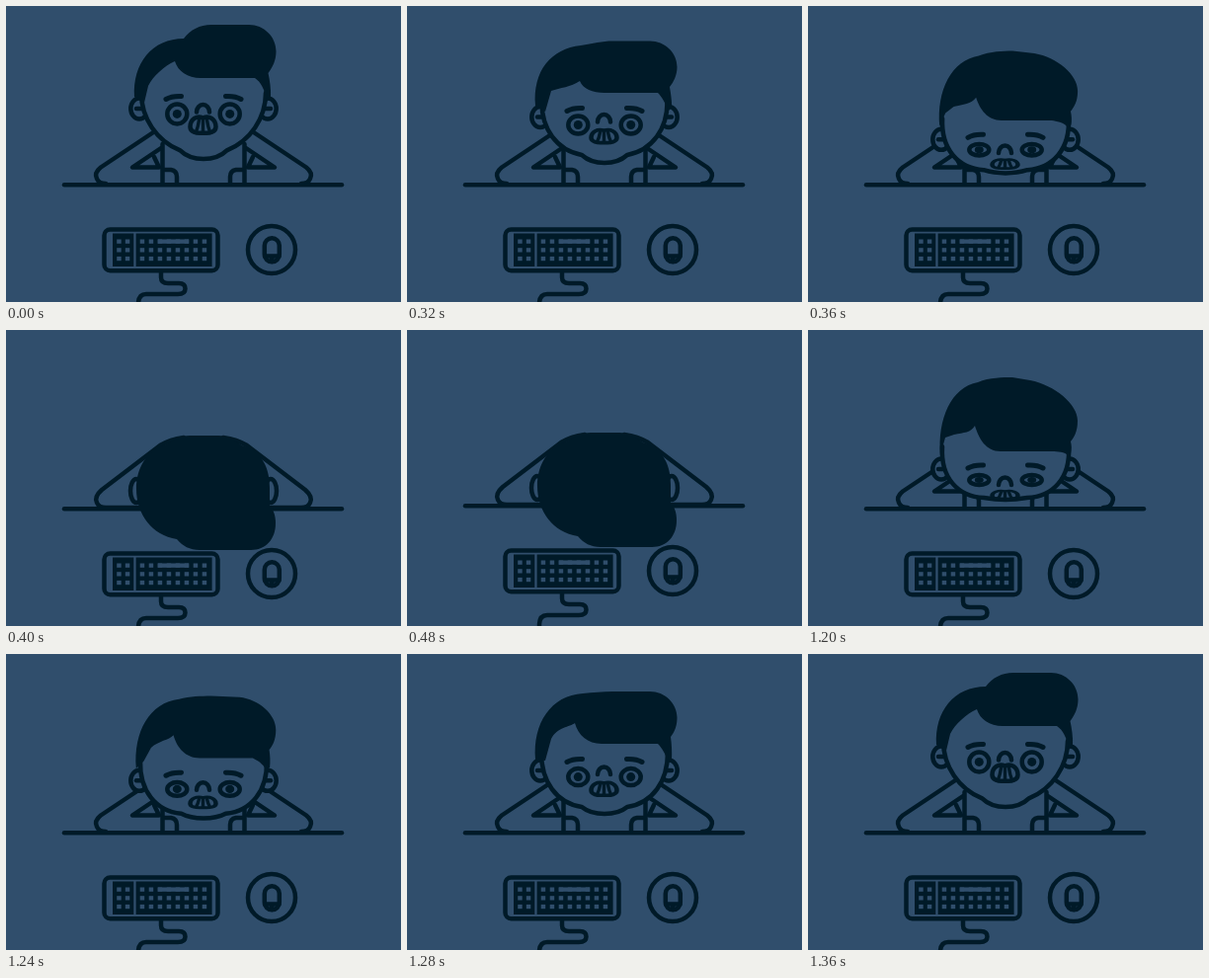
These frames come from a looping animation (400 px wide and 300 px high, 1480 ms). An HTML page:

```html
<!DOCTYPE html>
<html lang="en">
<head>
<meta charset="utf-8">
<title>Desk slump</title>
<style>
  html, body { margin: 0; width: 100%; height: 100%; overflow: hidden; background: #304e6c; }
  svg { display: block; width: 100%; height: 100%; }
  .line { fill: none; stroke: #001a28; stroke-width: 4.5; stroke-linecap: round; stroke-linejoin: round; }
  .skin { fill: #304e6c; }
  .solid { fill: #001a28; stroke: none; }
  .key { fill: #304e6c; stroke: none; }
  .brow { stroke-width: 5; }
  .thin { stroke-width: 3.4; }
</style>
</head>
<body>
<svg viewBox="0 0 400 300">
  <g id="scene" class="line">
    <g id="person"></g>
    <path d="M59 181.2H340"/>
    <rect x="99.5" y="226.5" width="115" height="41.7" rx="6"/>
    <g id="keys"></g>
    <path d="M157 269V275Q157 281 164 281H175Q181.5 281 181.5 286.5Q181.5 292 174 292H142Q134.5 292 134 301V312"/>
    <circle cx="269" cy="247" r="24"/>
    <rect x="261.8" y="235.3" width="15" height="24" rx="7.5"/>
    <path d="M262 253.5H276.5M269.3 254V259"/>
  </g>
</svg>
<script>
const LOOP = 1480;
const scene = document.getElementById('scene');
const person = document.getElementById('person');

// Feature heights, then the hair and jaw outlines; all poses share one structure.
const upright = {
  eye: 109.4, open: 10, brow: 91.5, nose: 99.5, mouth: 120.5, bite: 1, ear: 104,
  hair: 'M130 92C128 58 148 33 180 33C187 24 196 19 208 19L246 19C261 19 273.5 31 273.5 46C273.5 55 270 62 265.5 68C267 75 268.5 84 268 93L264 97C262 84 258 77 252 73L197 73C184 73 174 66 171 56C160 61 149 71 144 81L140 98Z',
  jaw: 'M137 88C137 113.7 152.6 136.8 176.4 146.4C182 152 190 155 200 155C210 155 218 152 223.6 146.4C247.4 136.8 263 113.7 263 88'
};
const sinking = {
  eye: 120.5, open: 9, brow: 103.5, nose: 109.5, mouth: 132, bite: .8, ear: 112.5,
  hair: 'M130 101C127 66 146 43 176 40C188 38 198 35.5 208 35.5L246 35.5C261 35.5 273.5 47 273.5 62C273.5 70 270 77 266 82C267 88 268.5 97 268 103L264 107C262 98 258 92 254 88L200 88C188 88 178 84 175 76C166 82 155 83 146 86L140 107Z',
  jaw: 'M136.5 98C136.5 124 151 146 177 151C183 156.5 191 159 200 159C209 159 217 156.5 223 151C249 146 263.5 124 263.5 98'
};
const rising = {
  eye: 124.6, open: 8.5, brow: 106.5, nose: 114, mouth: 136.7, bite: .8, ear: 118,
  hair: 'M130 107C127 70 146 42 178 40C188 38.5 198 38.5 208 38L246 38C261 38 273.5 50 273.5 64.5C273.5 73 271 79 267 84C268 91 268.5 100 268 107L264 110C262 101 258 95 254 91L197 91C183 91 173 82 170 70C165 74 152 74 146 86L140 108Z',
  jaw: 'M136 100C136 129 151 151 177 155C183 160 191 162 200 162C209 162 217 160 223 155C249 151 264 129 264 100'
};
const bowed = {
  eye: 152, open: 5, brow: 137, nose: 149, mouth: 167, bite: .5, ear: 141,
  hair: 'M134 127C131 90 145 58 172 53C184 48 197 48 207 48L225 51C250 56 273 75 273 92C273 104 269 109 266 113C267 117 267 121 266 125L262 126C258 123 250 123 245 123L195 123C180 123 173 110 169 97C165 104 158 104 148 106L139 109Z',
  jaw: 'M136 118C134 150 152 169 178 170C184 171 192 172 200 172C208 172 216 171 222 170C248 169 266 150 264 118'
};

function mix(a, b, t) {
  if (typeof a === 'number') return a + (b - a) * t;
  if (typeof a === 'string') {
    const number = /-?\d+(\.\d+)?/g;
    const goal = b.match(number);
    let i = 0;
    return a.replace(number, n => mix(+n, +goal[i++], t).toFixed(2));
  }
  return Object.fromEntries(Object.keys(a).map(k => [k, mix(a[k], b[k], t)]));
}

const path = (d, type = '') => `<path class="${type}" d="${d}"/>`;
const both = half => `${half}<g transform="translate(400) scale(-1 1)">${half}</g>`;
const ellipse = (x, y, rx, ry, type = '') => `<ellipse class="${type}" cx="${x}" cy="${y}" rx="${rx}" ry="${ry}"/>`;

const body = both(
  path('M150 127.5L96 163.5Q89 169 92 175Q94 180 101 180') +
  path('M157 144L128 163.5H155L150 153') +
  path('M158.5 140V180M158.5 166H167Q173 167 173 173V180')
);

function drawAwake(p) {
  const { eye, brow, nose, ear } = p;
  const ears = both(ellipse(135, ear, 8.7, 10.5, 'skin'));
  const earFolds = both(path(`M132 ${ear}H137`));
  const face = both(
    ellipse(173.3, eye, 10, p.open) +
    ellipse(173.3, eye, 4.5, Math.min(4.5, p.open * .6), 'solid') +
    path(`M162 ${brow + 3}Q168 ${brow - .5} 177.5 ${brow}`, 'brow')
  );
  const mouth = `<g transform="translate(199.5 ${p.mouth}) scale(1 ${p.bite})">` +
    path('M-13 2C-13 -6 -6 -10 0 -7C6 -10 13 -6 13 2C13 7 7 9 0 8C-7 9 -13 7 -13 2Z') +
    path('M-4 -5Q-5 2 -7 7M0 -6V8M4 -5Q5 2 7 7', 'thin') + '</g>';
  return body + ears + path(p.jaw, 'skin') + earFolds + face +
    path(`M193 ${nose + 8}A6.5 7.5 0 0 1 206 ${nose + 8}`) +
    mouth + path(p.hair, 'solid');
}

function drawSlumped() {
  return both(path('M180 109Q166 111 156 117L97 162Q89 169 92 175Q94 180 101 180H134') +
    ellipse(132, 163, 6, 12, 'skin')) +
    path('M162 116C170 111 177 107 186 107H215C224 107 232 112 239 117C259 123 267 139 267 160V179C271 182 273 188 273 196C273 212 263 223 248 223H196C186 223 179 219 173 212C148 208 132 187 132 161C132 139 143 122 162 116Z', 'solid');
}

function drawKeys() {
  const rect = (type, x, y, w, h) => `<rect class="${type}" x="${x}" y="${y}" width="${w}" height="${h}"/>`;
  const key = (x, y, w = 4.5) => rect('key', x, y, w, 4.3);
  let out = rect('solid', 108, 230.5, 21.3, 33.5) + rect('solid', 131.6, 230.5, 77, 33.5);
  for (let row = 0; row < 3; row++) {
    const y = 236.5 + row * 8.7;
    out += key(112.2, y) + key(120.8, y);
    for (let col = 0; col < 8; col++) out += key(135.7 + col * 9, y);
  }
  return out + key(153.7, 236.5, 31.5);
}

const awakeFrames = [
  [0, upright], [320, sinking], [360, mix(sinking, bowed, .8)],
  [1200, bowed], [1240, mix(bowed, rising, .55)], [1280, rising],
  [1320, mix(rising, upright, .65)], [1360, upright]
];
const jolts = [0, 4, -3, 2, -1];

function render(time) {
  const t = time % LOOP;
  const slumped = t >= 400 && t < 1200;
  const jolt = slumped ? jolts[Math.floor((t - 400) / 40)] || 0 : 0;
  person.innerHTML = slumped
    ? drawSlumped()
    : drawAwake(awakeFrames.findLast(([start]) => start <= t)[1]);
  scene.setAttribute('transform', `translate(0 ${jolt})`);
}

document.getElementById('keys').innerHTML = drawKeys();
const start = performance.now();
function tick() {
  render(performance.now() - start);
  requestAnimationFrame(tick);
}
tick();
</script>
</body>
</html>
```
